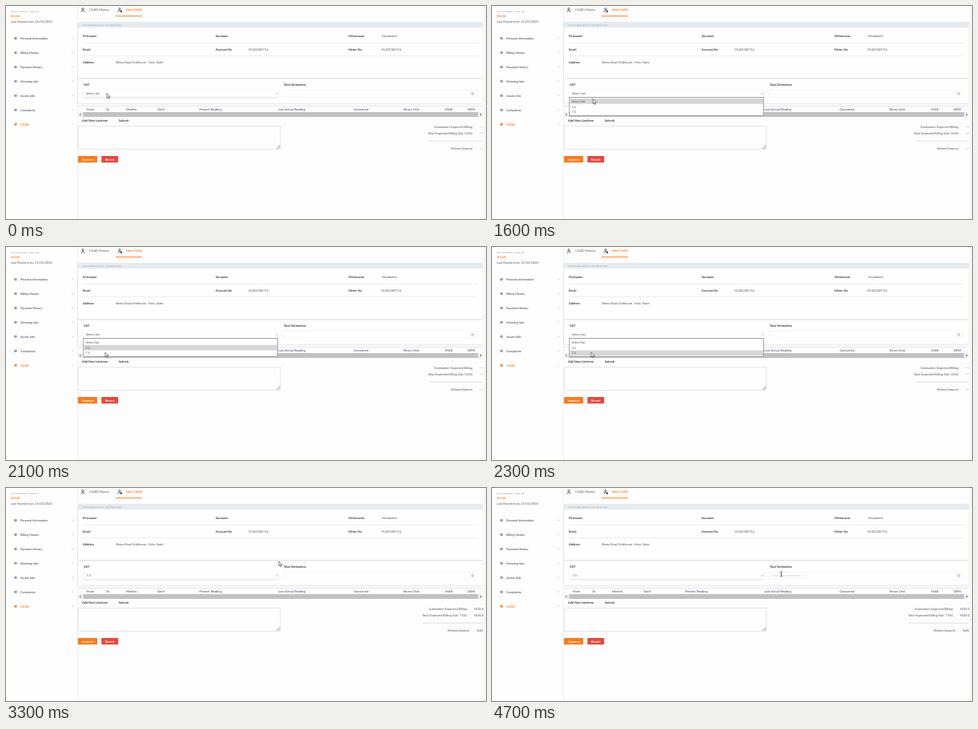
Recreate the animation shown at these times as an HTML page. Size 600 px wide and 267 px high, loop 5 s.

```html
<!DOCTYPE html>
<html lang="en">
<head>
<meta charset="utf-8">
<title>Billing adjustment form</title>
<style>
html, body { margin: 0; width: 100%; height: 100%; overflow: hidden; background: #fdfdfd; }
svg { display: block; width: 100vw; height: 100vh; }
text { font: 3.9px Lato, "Open Sans", sans-serif; fill: #55565a; text-rendering: geometricPrecision; white-space: pre; }
.bold { font-weight: 700; fill: #3a3c42; }
.nav { font-weight: 700; fill: #5c6474; font-size: 3.7px; }
.head { font-weight: 700; fill: #66738a; }
.caps { font-size: 2.4px; fill: #737f8e; letter-spacing: .55px; }
.orange { font-weight: 700; fill: #fa7d22; }
.white { font-weight: 700; fill: #fff; }
.pale { fill: #c4c6ca; }
</style>
</head>
<body>
<svg id="stage" viewBox="0 0 600 267">
  <defs>
    <filter id="soft" x="-5%" y="-30%" width="110%" height="180%">
      <feDropShadow dx="0" dy=".8" stdDeviation=".8" flood-color="#000" flood-opacity=".13"/>
    </filter>
    <clipPath id="pane"><rect width="597" height="267"/></clipPath>
  </defs>
  <g id="page" clip-path="url(#pane)"></g>
  <g id="before"></g>
  <g id="after" clip-path="url(#pane)"></g>
  <g id="focus"></g>
  <g id="menu"></g>
  <g id="pointers" stroke-linejoin="round">
    <path id="arrow" d="M0 0V5.8L1.4 4.6L2.4 6.8L3.3 6.4L2.4 4.2H4.2Z" fill="#fff" stroke="#333" stroke-width=".6"/>
    <path id="hand" d="M0 .7Q.7-.3 1.4.7V3L4 3.6Q4.7 4 4.4 5.2L3.9 7.5H.7L-1.3 5Q-1.5 4-.8 4.1L0 4.8Z" fill="#fff" stroke="#333" stroke-width=".6"/>
    <path id="beam" d="M-1.2-3H-.3L0-2.7L.3-3H1.2M0-2.7V2.7M-1.2 3H-.3L0 2.7L.3 3H1.2" fill="none" stroke="#222" stroke-width=".7"/>
  </g>
</svg>
<script>
const $ = id => document.getElementById(id);
const NS = "http://www.w3.org/2000/svg";
const ORANGE = "#ff7a1a";

function add(parent, tag, attrs, label) {
  const el = document.createElementNS(NS, tag);
  for (const k in attrs) el.setAttribute(k, attrs[k]);
  if (label) el.textContent = label;
  return $(parent).appendChild(el);
}
const rect = (p, x, y, width, height, fill, more) => add(p, "rect", { x, y, width, height, fill, ...more });
const line = (p, x1, y, x2, stroke, w = 1) => add(p, "path", { d: `M${x1} ${y}H${x2}`, stroke, "stroke-width": w });
const path = (p, d, stroke, w = .6) => add(p, "path", { d, stroke, "stroke-width": w, fill: "none" });
// y is the middle of the line of text
const text = (p, x, y, label, cls = "", more) => add(p, "text", { x, y: y + 1.4, class: cls, ...more }, label);
const rightText = (p, x, y, label) => text(p, x, y, label, "", { "text-anchor": "end" });

function sidebar() {
  rect("page", 0, 0, 90, 267, "#fefefe");
  path("page", "M89.5 0V267", "#f0f0f2", 1);
  text("page", 6, 6.6, "OUTSTANDING AMOUNT", "caps", { style: "font-size:2.3px;letter-spacing:.48px" });
  text("page", 6, 13, "₦ 0.00", "orange", { style: "font-size:3.7px" });
  text("page", 6, 19.3, "Last Payment on: 21/03/2020");
  ["Personal Information", "Billing History", "Payment History", "Metering Info", "Assets Info", "Complaints", "CAAD"]
    .forEach((name, i) => {
      const y = 40.4 + i * 17.95, last = i === 6;
      const color = last ? ORANGE : "#8391ab";
      rect("page", 10.3, y - 1.4, 3.2, 3, color, { rx: .6 });
      line("page", 11, y - .2, 12.8, "#fff", .4);
      text("page", 18, y, name, last ? "orange" : "nav");
      path("page", `M82.6 ${y - 1}l1 1l-1 1`, last ? ORANGE : "#7d8798", .5);
    });
}

function person(x, color) {
  add("page", "circle", { cx: x, cy: 3.7, r: 1.2, fill: "none", stroke: color, "stroke-width": .7 });
  path("page", `M${x - 2} 7.5Q${x - 2} 5.6 ${x} 5.6T${x + 2} 7.5`, color, .8);
}

function customer() {
  person(96, "#333b48");
  text("page", 104, 5, "CAAD History", "", { style: "font-size:4px" });
  person(142, "#333b48");
  rect("page", 143, 5.6, 2, 2, "#333b48");
  text("page", 150, 5, "New CAAD", "orange");
  line("page", 137, 12.6, 170, ORANGE, .9);

  rect("page", 90.5, 20, 505.5, 70, "#fefefe", { filter: "url(#soft)" });
  rect("page", 90, 20, 506, 7, "#e6ebef");
  text("page", 95, 23.2, "CUSTOMER BASIC INFOMATION", "caps");
  [["Firstname", 96, 38], ["Surname", 262, 38], ["Othername", 428, 38],
   ["Email", 96, 54.2], ["Account No", 262, 54.2], ["Meter No", 428, 54.2], ["Address", 96, 70.6]]
    .forEach(([s, x, y]) => text("page", x, y, s, "bold"));
  text("page", 470, 38, "Morabekisi");
  text("page", 303.3, 54.2, "01402385716");
  text("page", 469.3, 54.2, "01402385716");
  text("page", 137.5, 70.6, "Bema Road Gridhouse , Kelu. State.");
  [46.5, 62.5].forEach(y => line("page", 96, y, 590, "#eeeef0"));
}

function form() {
  rect("page", 90.5, 92, 505.5, 29.5, "#fefefe", { filter: "url(#soft)" });
  text("page", 97, 98.4, "VAT", "bold");
  text("page", 347, 98.4, "Total Estimation", "bold");
  rect("page", 97, 105.4, 243, 8.6, "#fff", { rx: .8, filter: "url(#soft)" });
  path("page", "M337.1 109.4l.9 1l.9-1", "#555", .5);
  rect("page", 346.5, 105.5, 242, 8.5, "#fefefe", { rx: .8, stroke: "#ececef", "stroke-width": .6 });
  rect("page", 582, 108.2, 2.7, 3.2, "none", { stroke: "#8c8f96", "stroke-width": .4 });
  path("page", "M582.6 109.4h1.5M582.6 110.4h1.5", "#8c8f96", .35);

  line("page", 90, 125.5, 596, "#e6e7ea");
  Object.entries({
    From: 101, To: 125, Months: 150, Tarrif: 189, "Present Reading": 241.5, "Last Actual Reading": 340.5,
    Consumed: 434.5, "Recon Unit": 497, MAB: 549, DRM: 577
  }).forEach(([s, x]) => text("page", x, 129.8, s, "head"));
  rect("page", 90, 133, 506, 6, "#f0f0f0");
  rect("page", 96.5, 133, 493.5, 6, "#c2c2c2");
  path("page", "M93.7 134.7l-1.4 1.4l1.4 1.4M592.6 134.7l1.4 1.4l-1.4 1.4", "#444", .8);

  text("page", 95, 143.9, "Add New Lineitem", "bold");
  text("page", 141, 143.9, "Submit", "bold");
  rect("page", 90.5, 150.5, 252.5, 29, "#fefefe", { stroke: "#e4e5e8", "stroke-width": .9 });
  path("page", "M337.5 179l5-5M340 179l2.5-2.5M338.8 179l3.7-3.7", "#888", .5);
  rect("page", 90, 188, 24, 8.3, ORANGE, { rx: .6 });
  rect("page", 119.3, 188, 20.9, 8.3, "#e6493f", { rx: .6 });
  text("page", 102.2, 192.1, "Approve", "white", { "text-anchor": "middle" });
  text("page", 129.7, 192.1, "Revert", "white", { "text-anchor": "middle" });
}

function summary(p, edge, refundEdge, rate, left, values) {
  rightText(p, edge, 151.5, "Summation Expected Billing");
  rightText(p, edge, 159.8, `Total Expected Billing (Vat: ${rate}%)`);
  rightText(p, refundEdge, 178.5, "Refund Amount");
  line(p, left, 169.2, 596, "#c9cbd0", .6);
  [151.5, 159.8, 178.5].forEach((y, i) => text(p, values[i][0], y, values[i][1]));
}

sidebar();
customer();
form();
rect("stage", 597, 0, 3, 267, "#f7f7f8");
$("stage").append($("pointers"));

text("before", 100, 110, "Select Vat");
summary("before", 583, 583, "0.0", 529, [[592, "---"], [592, "---"], [592, "---"]]);
text("after", 100.5, 110, "7.5");
summary("after", 576, 579, "7.5", 521, [[585, "NGN 0"], [585, "NGN 0"], [588.5, "NaN"]]);
text("focus", 351, 110, "Enter Total Estimation", "pale", { style: "font-size:3.7px" });
const caret = path("focus", "M350.9 107.3V112", "#555", .5);

rect("menu", 96.8, 114.5, 242.7, 22.8, "#fefefe", { stroke: "#8e8e8e", "stroke-width": .8 });
const bar = rect("menu", 97.2, 116, 241.9, 6.7, "#d6d6d6");
["Select Vat", "2.5", "7.5"].forEach((s, i) => text("menu", 99.5, 119.4 + i * 6.8, s));

// time, x, y
const track = [
  [1300, 126, 109.5], [1500, 126.3, 113], [1800, 125.5, 124], [2000, 124, 132],
  [2800, 124, 132.5], [2900, 135, 129], [3000, 181, 116], [3100, 239, 103],
  [3200, 296, 94], [3300, 341, 92], [3400, 359, 105], [3500, 360.5, 111],
  [3600, 362.5, 112.5], [3800, 361.5, 108]
];

function place(t) {
  const next = track.findIndex(k => k[0] > t);
  if (next === 0) return track[0].slice(1);
  if (next < 0) return track.at(-1).slice(1);
  const [a, b] = [track[next - 1], track[next]];
  const u = (t - a[0]) / (b[0] - a[0]);
  return [a[1] + (b[1] - a[1]) * u, a[2] + (b[2] - a[2]) * u];
}

const show = (el, on) => el.style.display = on ? "" : "none";

function draw(now) {
  const t = Math.floor(now % 5000 / 100) * 100;
  show($("before"), t < 2700);
  show($("after"), t >= 2700);
  show($("menu"), t >= 1300 && t < 2700);
  show($("focus"), t >= 4300);
  show(caret, t < 4700);
  const row = t < 2100 ? 0 : t < 2300 ? 1 : 2;
  bar.setAttribute("y", 116 + row * 6.8);

  const kind = t >= 3400 ? "beam" : t >= 2700 && t < 3000 ? "hand" : "arrow";
  ["arrow", "hand", "beam"].forEach(id => show($(id), id === kind));
  $("pointers").setAttribute("transform", `translate(${place(t)})`);
}

const start = performance.now();
function tick() {
  draw(performance.now() - start);
  requestAnimationFrame(tick);
}
tick();
</script>
</body>
</html>
```
